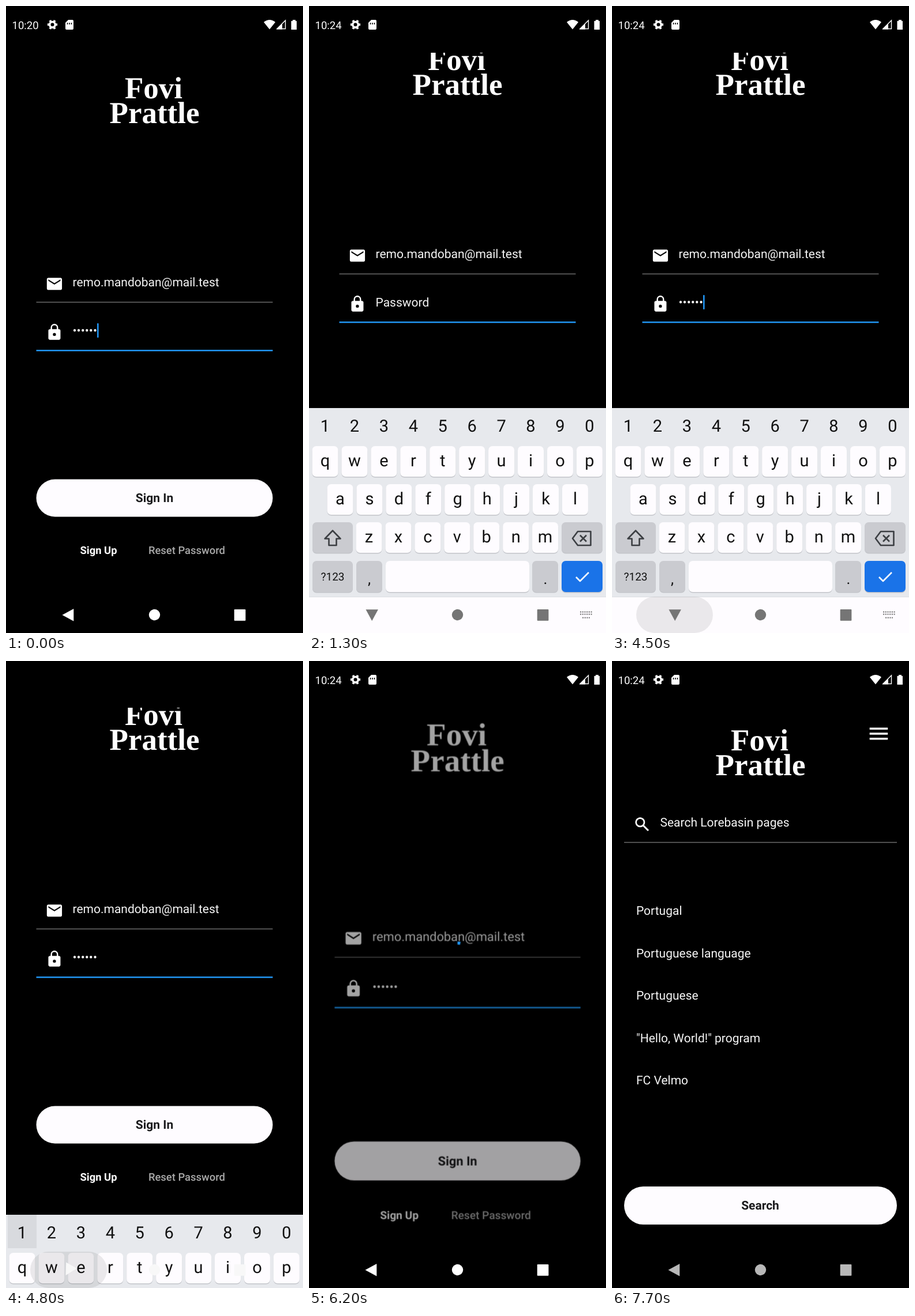
These frames come from a looping animation (515 by 1087 pixels, 7.9 s). An HTML page:

```html
<!DOCTYPE html>
<html lang="en">
<head>
<meta charset="utf-8">
<title>Sign-in demo</title>
<style>
  html, body { margin: 0; width: 100%; height: 100%; overflow: hidden; background: #000; }
  svg { display: block; width: 100vw; height: 100vh; font-family: Roboto, sans-serif; text-rendering: geometricPrecision; }
  .body { font-size: 21px; fill: #f5f5f5; }
  .bold { font-size: 21px; font-weight: 700; fill: #1b1b1d; text-anchor: middle; }
  .link { font-size: 18.4px; font-weight: 500; }
  .title { font: bold 53px "Liberation Serif", "Noto Serif", serif; text-anchor: middle; fill: #fff; }
  .key { font-size: 29px; fill: #111; text-anchor: middle; }
</style>
</head>
<body>
<svg viewBox="0 0 515 1087" preserveAspectRatio="none">
  <defs>
    <clipPath id="below"><rect y="81" width="515" height="1006"/></clipPath>
    <clipPath id="pill"><rect x="52.5" y="820.5" width="410" height="65" rx="32.5"/></clipPath>
    <g id="title">
      <text class="title" x="256" y="160">Fovi</text>
      <text class="title" x="257.5" y="203">Prattle</text>
    </g>
  </defs>
  <rect width="515" height="1087"/>

  <g clip-path="url(#below)">
    <g id="login">
      <use href="#title"/>
      <path fill="#fff" transform="translate(68.2 466) scale(1.3125)" d="M20 4H4c-1.1 0-2 .9-2 2v12c0 1.1.9 2 2 2h16c1.1 0 2-.9 2-2V6c0-1.1-.9-2-2-2zm0 4l-8 5-8-5V6l8 5 8-5z"/>
      <text class="body" x="115.5" y="486">remo.mandoban@mail.test</text>
      <path d="M52.5 513.5H462.5" stroke="#6c6c6c" stroke-width="1.4"/>
      <path fill="#fff" transform="translate(68.2 549.8) scale(1.3125)" d="M18 8h-1V6A5 5 0 0 0 7 6v2H6c-1.1 0-2 .9-2 2v10c0 1.1.9 2 2 2h12c1.1 0 2-.9 2-2V10c0-1.1-.9-2-2-2zm-6 9a2 2 0 1 1 0-4 2 2 0 0 1 0 4zm3.1-9H8.9V6a3.1 3.1 0 0 1 6.2 0z"/>
      <circle id="touch" cx="150" cy="586" r="14" fill="#1c1c1c"/>
      <text id="secret" class="body" x="115.5" y="570"></text>
      <rect id="caret" y="550" width="2.6" height="25" rx="1" fill="#2196f3"/>
      <path id="rule" d="M52.5 597.3H462.5"/>
      <rect x="52.5" y="820.5" width="410" height="65" rx="32.5" fill="#fefcff"/>
      <circle id="splash" cx="257.5" cy="853" clip-path="url(#pill)"/>
      <text class="bold" x="257.5" y="860">Sign In</text>
      <text class="link" x="128.5" y="950" fill="#fff" style="font-weight:700">Sign Up</text>
      <text class="link" x="247" y="950" fill="#a9a9a9">Reset Password</text>
    </g>
  </g>

  <g id="home">
    <use href="#title" y="-5"/>
    <path d="M446.7 117.2h31.5m-31.5 8.75h31.5m-31.5 8.75h31.5" stroke="#fff" stroke-width="3.5"/>
    <g fill="none" stroke="#fff" stroke-width="2.7">
      <circle cx="48.8" cy="279.6" r="7.2"/>
      <path d="M54 285L63 294" stroke-width="3"/>
    </g>
    <text class="body" x="83.5" y="287">Search Lorebasin pages</text>
    <path d="M21 314.5H494" stroke="#6c6c6c" stroke-width="1.4"/>
    <g id="list"></g>
    <rect x="21" y="911" width="473" height="66" rx="33" fill="#fefcff"/>
    <text class="bold" x="257" y="951">Search</text>
  </g>
  <circle id="spinner" cx="257.5" cy="511" r="22" fill="none" stroke="#2196f3" stroke-width="5.2" transform="rotate(-90 257.5 511)"/>

  <g id="status" fill="#fff">
    <text id="clock" x="10.5" y="39.8" font-size="18.5"></text>
    <g fill="none" stroke="#fff">
      <circle cx="80.5" cy="32.3" r="4.8" stroke-width="3.6"/>
      <circle cx="80.5" cy="32.3" r="7.2" stroke-width="2.8" pathLength="12" stroke-dasharray="1 1" stroke-dashoffset=".5"/>
    </g>
    <path d="M108 24h7q2 0 2 2v13q0 2-2 2h-10q-2 0-2-2V29z"/>
    <path d="M106.5 29v3m3.5-3v3m3.5-3v3" stroke="#000" stroke-width="1.5"/>
    <path d="M447 28Q457 20 467 28L457 40.5Z"/>
    <path d="M470 39.5L484.5 25V39.5Z" fill="none" stroke="#fff" stroke-width="1.4"/>
    <path d="M469 40.5L479 30.5V40.5Z"/>
    <path d="M497 24h5v2h2v15h-9.5V26h2.5z"/>
  </g>

  <g id="board">
    <rect y="697" width="515" height="328" fill="#e7e9ed"/>
    <rect y="1024" width="515" height="63" fill="#fefcff"/>
    <path d="M0 1024.5H515" stroke="#dcdee2"/>
    <rect id="hover" x="3" y="697" width="50" height="58" fill="#d8dade"/>
    <g id="keys"></g>
    <g fill="none" stroke="#3c3f43" stroke-width="2.6" stroke-linejoin="round">
      <path d="M41 909.5L54.5 923.5H47.5V935H34.5V923.5H27.5Z"/>
      <path d="M466 911H488.5V935H466L457 923ZM470 917.5l11 11m0-11l-11 11"/>
      <path d="M463 990l7 7 15-15" stroke="#fff"/>
    </g>
  </g>

  <rect id="press" x="42" y="1024" width="133" height="63" rx="31.5"/>
  <g id="nav">
    <path id="back" d="M97.5 1055.7L117.3 1045V1066.4Z"/>
    <circle cx="257.5" cy="1055.5" r="9.7"/>
    <rect x="395.7" y="1046" width="19.7" height="19.7" rx="1"/>
    <path id="switch" d="M470 1050.5h21m-21 4h21m-17 6h13" fill="none" stroke-width="2" stroke-dasharray="2.2 1.5"/>
  </g>
</svg>

<script>
const LOOP = 7900, STEP = 100;
const $ = id => document.getElementById(id);
const set = (id, attrs) => {
  for (const k in attrs) $(id).setAttribute(k, attrs[k]);
};
const show = (id, on) => set(id, { visibility: on ? 'visible' : 'hidden' });
const within = (t, a, b) => t >= a && t < b;

// Piecewise linear value through [time, value] points.
function track(t, pts) {
  if (t <= pts[0][0]) return pts[0][1];
  for (let i = 1; i < pts.length; i++) {
    const [a, u] = pts[i - 1], [b, v] = pts[i];
    if (t <= b) return u + (v - u) * (t - a) / (b - a);
  }
  return pts[pts.length - 1][1];
}

const zoom = (s, cy) => `translate(257.5 ${cy}) scale(${s}) translate(-257.5 ${-cy})`;

function buildKeys() {
  const out = [], WHITE = '#fefcff', GREY = '#cacbd0';
  const cap = (x, y, w, fill, h = 53) => out.push(
    `<rect x="${x}" y="${y + 1.5}" width="${w}" height="${h}" rx="7" fill="#c3c5ca"/>` +
    `<rect x="${x}" y="${y}" width="${w}" height="${h}" rx="7" fill="${fill}"/>`);
  const label = (s, x, y, size = 29) =>
    out.push(`<text class="key" x="${x}" y="${y}" style="font-size:${size}px">${s}</text>`);
  const row = (chars, x0, y) => [...chars].forEach((c, i) => {
    const x = x0 + i * 50.93;
    cap(x - 22.5, y, 45, WHITE);
    label(c, x, y + 35);
  });
  [...'1234567890'].forEach((c, i) => label(c, 28 + i * 50.93, 738));
  row('qwertyuiop', 28, 763);
  row('asdfghjkl', 54, 829);
  row('zxcvbnm', 104, 895);
  cap(6, 895, 70, GREY);
  cap(438, 895, 71, GREY);
  cap(6, 962, 70, GREY, 54);
  cap(82, 962, 45, GREY, 54);
  cap(133, 962, 249, WHITE, 54);
  cap(387, 962, 45, GREY, 54);
  cap(438, 962, 71, '#1a73e8', 54);
  label('?123', 41, 996, 19);
  label(',', 104.5, 1002, 26);
  label('.', 410, 1002, 26);
  $('keys').innerHTML = out.join('');
}

const pages = ['Portugal', 'Portuguese language', 'Portuguese', '"Hello, World!" program', 'FC Velmo'];
$('list').innerHTML = pages.map((s, i) =>
  `<text class="body" x="42" y="${440 + i * 73.5}">${s}</text>`).join('');
buildKeys();

const typedAt = [1800, 2100, 2400, 2700, 3000, 3500];
const caretOn = [[0, 100], [900, 1250], [1600, 3700], [4200, 4700], [5200, 5750]];

function password(t) {
  if (t < 100) return '•'.repeat(6);
  const n = typedAt.filter(a => t >= a).length;
  if (!n) return '';
  return '•'.repeat(n - 1) + (t < 4200 ? 'qwerty'[n - 1] : '•');
}

function drawLogin(t) {
  const shift = track(t, [[1000, 0], [1100, -13], [1200, -36], [1300, -49], [4800, -49], [4900, -20], [5000, 0]]);
  const leaving = t >= 6200;
  set('login', {
    transform: leaving ? zoom(1.04, 510) : `translate(0 ${shift})`,
    opacity: leaving ? 0.64 : 1
  });
  show('login', t < 6300);

  const typed = password(t), field = $('secret');
  field.textContent = typed || 'Password';
  const width = typed ? field.getComputedTextLength() : 0;
  set('caret', {
    x: 115.5 + width,
    opacity: caretOn.some(([a, b]) => within(t, a, b)) ? (t === 5200 ? 0.5 : 1) : 0
  });

  const focus = t < 100 || t >= 900;
  set('rule', { stroke: focus ? '#2196f3' : '#6c6c6c', 'stroke-width': focus ? 2.6 : 1.4 });
  set('touch', { opacity: within(t, 800, 1200) ? 1 : 0 });
  set('splash', {
    r: track(t, [[5500, 30], [5700, 210]]),
    opacity: within(t, 5500, 5800) ? 0.1 : 0
  });
}

function drawHome(t) {
  set('home', {
    opacity: track(t, [[6200, 0], [6300, 0.6], [6500, 1]]),
    transform: zoom(track(t, [[6300, 0.97], [6500, 1]]), 543.5)
  });
  set('list', { opacity: t >= 6500 ? 1 : 0 });
  const arc = track(t, [[6200, 5], [6300, 20], [6400, 45]]);
  set('spinner', {
    'stroke-dasharray': `${arc} 200`,
    opacity: within(t, 6200, 6500) ? 1 : 0
  });
}

function drawSystem(t) {
  $('clock').textContent = t < 100 ? '10:20' : '10:24';
  show('status', !within(t, 4700, 4900));

  const top = track(t, [[1000, 1087], [1100, 862], [1200, 740], [1300, 697],
    [4600, 697], [4700, 780], [4800, 960], [4900, 1087]]);
  set('board', { transform: `translate(0 ${top - 697})` });
  show('board', top < 1087);
  set('hover', { opacity: within(t, 4700, 4900) ? 1 : 0 });
  set('press', { opacity: within(t, 4500, 4900) ? 0.08 : 0 });

  const tone = Math.round(track(t, [[1000, 255], [1100, 153], [1300, 117], [4600, 117], [4700, 190],
    [4800, 248], [4900, 255], [7100, 255], [7200, 240], [7300, 240], [7400, 222], [7500, 222], [7600, 200], [7700, 184]]));
  const color = `rgb(${tone},${tone},${tone})`;
  set('nav', { fill: color });
  set('switch', { stroke: t < 1200 ? '#c4c4c6' : color });
  show('switch', within(t, 1100, 4800));
  const turn = track(t, [[1100, 0], [1200, -45], [1300, -90], [4600, -90], [4700, -80], [4800, -60], [4900, -20], [5000, 0]]);
  set('back', { transform: `rotate(${turn} 108.5 1055)` });
}

let start;
function tick(now) {
  start ??= now;
  const t = Math.floor(((now - start + 1) % LOOP) / STEP) * STEP;
  drawLogin(t);
  drawHome(t);
  drawSystem(t);
  requestAnimationFrame(tick);
}
requestAnimationFrame(tick);
</script>
</body>
</html>
```
